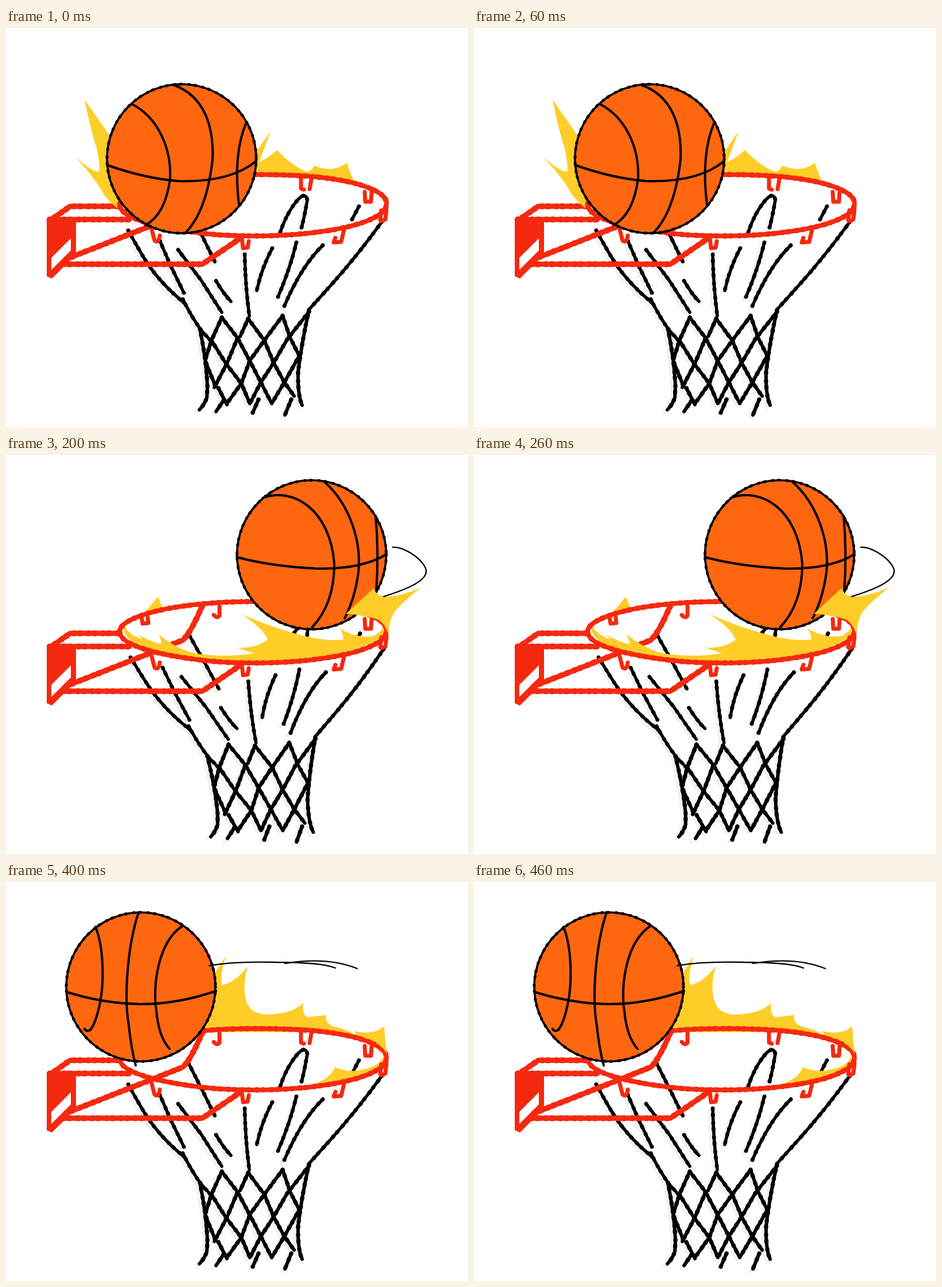
These frames come from a looping animation (805 px wide and 696 px high, 500 ms). An HTML page with a canvas:

```html
<!DOCTYPE html>
<html lang="en">
<head>
<meta charset="utf-8">
<title>Ball circling the rim</title>
<style>
html, body { margin: 0; width: 100%; height: 100%; overflow: hidden; background: #fff; }
canvas { display: block; }
</style>
</head>
<body>
<canvas id="stage" width="805" height="696"></canvas>
<script>
const ctx = document.getElementById('stage').getContext('2d');
const RED = '#f5290f', ORANGE = '#ff6610', YELLOW = '#ffcd27', INK = '#000', SHADE = '#f2f2f2';
const POSE_MS = 100, RADIUS = 130;

const path = (...parts) => new Path2D(parts.join(' '));

function line(shape, width, color = INK) {
  ctx.lineWidth = width;
  ctx.strokeStyle = color;
  ctx.stroke(shape);
}

// A stroke with the lumpy edge of a dry brush
function brush(shape, width, color = INK) {
  line(shape, width, color);
  ctx.setLineDash([1, 9, 2, 13]);
  line(shape, width + 1.4, color);
  ctx.setLineDash([]);
}

function fill(shape, color) {
  ctx.fillStyle = color;
  ctx.fill(shape);
}

// Hoop
const rim = path(
  'M198 308C198 285 270 266 340 260C400 253 510 255 560 262',
  'C620 270 663 286 663 306C663 330 610 347 550 355',
  'C490 364 410 365 350 359C280 351 198 335 198 308Z');
const plate = path('M71 333L122 335V395L80 437L71 433Z');
const slot = path('M79 401L113 367V388L79 422Z');
const bracket = path(
  'M76 336L112 311H198M76 334H215',
  'M100 412H342L408 367',
  'M105 403L250 346L308 323Q322 310 342 263');
const hooks = path(
  'M236 283L238 294L248 293L247 284M372 264V280Q368 286 362 279',
  'M514 263V280L519 282M532 264L529 281',
  'M625 286L626 303L636 303L637 286M652 335L654 318M663 317L661 334L654 337',
  'M589 352L584 373L571 374L574 366M411 367L413 384L421 383L423 372',
  'M254 352L259 371Q266 376 268 362');

// Net at rest
const strands = path(
  'M213 353Q225 375 235 392Q262 440 310 479M308 473Q325 507 340 527L358 547',
  'M268 371L287 415L310 462M300 387L340 440L376 496M318 316L343 365L364 408',
  'M366 441Q380 465 392 477M416 395Q417 450 424 502',
  'M478 356Q490 320 510 298Q522 286 525 300Q520 330 515 348',
  'M464 384Q445 420 437 458M506 374Q495 420 474 469M552 379Q515 415 485 485',
  'M615 311L603 334M655 338Q610 400 565 450L529 490');
const mesh = path(
  'M338 525Q349 580 351 625L350 645Q345 658 337 666',
  'M528 492Q515 550 509 600Q508 640 516 658',
  'M376 505L358 545L347 580L365 625M376 505L403 540L425 581L444 618L463 655',
  'M422 507L408 538M422 507L450 545L467 585L485 618L502 642',
  'M482 502L450 545L425 580L410 620L385 655M482 502L495 540L511 572L485 618L463 655',
  'M403 542L385 585L363 627M358 545L383 585L410 620L425 655',
  'M528 495L490 543L467 583L443 620L425 655',
  'M370 628L385 657M379 650L366 669M440 648L430 671M497 648L486 675');

// Net while it swings
const swungStrands = path(
  'M210 345Q225 385 248 418Q285 465 322 492L352 540L368 550',
  'M268 370Q285 410 315 462M303 384L345 440L380 494M345 366L359 390',
  'M373 442Q380 462 394 477M418 397Q419 450 430 503',
  'M478 358Q495 310 515 296Q525 292 520 312L516 345',
  'M470 368Q450 410 438 447M512 369Q498 420 481 465M552 380Q520 420 493 487',
  'M620 303L606 333M655 338Q600 420 532 495');
const swungMesh = path(
  'M530 495Q520 560 520 610Q522 640 531 657M345 533Q350 600 360 652',
  'M362 550L372 512Q378 500 390 520L440 600L466 632M355 545Q380 590 418 630',
  'M430 510L470 570L506 620M428 510L405 560L372 620',
  'M489 498L462 548L437 590L420 632M489 498L500 530L516 555M528 502Q490 552 466 630',
  'M512 590Q507 620 504 662M372 634L393 664M411 632L426 664',
  'M445 634L463 666M464 636L497 653');

const still = { shapes: [strands, mesh], lean: 0 };
const leaning = { shapes: [strands, mesh], lean: 0.05 };
const swung = { shapes: [swungStrands, swungMesh], lean: 0 };

// Each pose: ball centre, seams, speed lines, flames behind and before the ball
const poses = [
  {
    ball: [306, 228], net: still,
    seams: path(
      'M291 99C345 118 362 170 360 228Q350 320 312 358',
      'M220 133C262 155 288 205 286 262Q278 325 243 344',
      'M419 164Q395 220 406 309M176 239Q240 262 300 267Q390 270 436 232'),
    flame: path(
      'M137 125L180 187L240 300L215 328Q190 315 170 290Q158 265 119 223',
      'Q150 252 162 250Q165 245 158 210Q148 180 137 125Z',
      'M430 225L461 180L441 234Q455 228 472 213Q500 242 525 251',
      'Q534 248 537 240Q570 254 594 235Q600 255 607 267L560 262L430 258Z')
  },
  {
    ball: [468.5, 229], net: still,
    seams: path(
      'M385 134C460 125 530 175 525 245C520 300 480 350 432 356',
      'M461 99C540 95 580 180 575 250Q568 310 545 334',
      'M284 236Q340 264 430 268Q560 272 598 233'),
    speed: path('M194 225Q215 243 290 242Q335 242 323 237H302'),
    flame: path(
      'M198 302Q210 318 262 331Q270 330 257 310Q282 326 296 322Q304 312 285 281',
      'Q310 300 333 311Q328 303 318 300L340 300Q343 290 323 256L345 275',
      'L440 360Q300 365 215 330Q196 318 198 302Z')
  },
  {
    ball: [532.5, 174], net: leaning,
    seams: path(
      'M447 75C500 55 565 95 572 190Q572 260 533 301',
      'M555 47C598 85 620 150 614 205Q608 250 590 285',
      'M644 106Q650 170 645 240M402 178Q460 194 540 198Q620 200 663 173'),
    speed: path('M674 161C700 160 735 190 732 205C728 225 680 240 658 247'),
    flame: path(
      'M205 290Q205 310 238 322L230 314Q255 326 270 330Q272 325 266 313',
      'Q300 340 330 346Q380 354 432 346L403 336Q435 338 456 322Q448 302 411 278',
      'Q465 302 525 317Q560 325 588 322Q588 315 582 303Q610 320 640 316',
      'Q655 308 657 300L663 308Q640 340 520 357Q400 368 260 345Q196 325 205 290Z',
      'M242 274L265 247L273 268Z'),
    frontFlame: path(
      'M592 277L641 232Q645 247 664 247Q690 246 723 231Q685 262 676 275',
      'Q668 290 666 312Q660 295 650 288Q630 280 592 277Z')
  },
  {
    ball: [294, 151], net: swung,
    seams: path(
      'M206 56C262 66 335 118 337 170C332 225 285 245 254 250',
      'M310 24C370 65 395 115 391 165Q385 230 352 268',
      'M168 158Q230 170 290 170Q360 168 424 145'),
    flame: path(
      'M372 256L413 190Q430 200 450 192Q490 180 512 147Q480 200 480 220',
      'Q490 228 519 212Q520 235 530 240Q590 230 625 190Q605 235 613 248',
      'Q630 253 660 243Q650 250 657 268Q670 285 712 277Q680 295 664 318',
      'Q640 342 560 350Q600 325 625 322Q652 318 658 300Q640 276 560 262Z',
      'M300 349Q345 345 362 324Q372 345 398 353Q412 352 413 344',
      'Q430 353 510 355L500 360H350Z'),
    frontFlame: path(
      'M370 252L414 185L418 195L440 195V252Z',
      'M657 265Q675 285 712 277Q680 295 666 315Q668 298 645 280Z')
  },
  {
    ball: [235, 183], net: still,
    seams: path(
      'M156 78C172 120 170 180 164 210Q157 245 147 258Q140 262 137 256',
      'M231 53C212 110 205 200 214 250Q218 290 226 320',
      'M307 77C265 105 255 180 262 225Q266 270 285 291',
      'M106 192Q170 212 235 213Q300 213 366 190'),
    speed: path('M354 146Q400 138 470 140Q550 140 574 150M486 142Q560 130 612 151'),
    flame: path(
      'M345 262L350 180L383 129Q372 165 376 180Q400 175 421 147Q408 195 425 220',
      'Q440 235 470 230Q500 228 518 211Q515 230 525 236L558 232Q555 245 570 252',
      'Q590 255 611 268L607 260Q640 268 659 252Q660 280 664 300L655 298',
      'Q630 275 560 262Z',
      'M530 354Q565 345 573 323Q600 335 630 325Q655 318 658 300L664 308Q650 340 530 354Z'),
    frontFlame: path('M645 261L659 252Q660 275 664 300Q657 288 645 281Z')
  }
];

function drawNet({ shapes, lean }) {
  const layer = (dx, dy, color) => {
    ctx.save();
    ctx.translate(dx, dy);
    ctx.transform(1, 0, lean, 1, -270 * lean, 0);
    brush(shapes[0], 5.5, color);
    brush(shapes[1], 6, color);
    ctx.restore();
  };
  layer(-5, 4, SHADE);
  layer(0, 0, INK);
}

function drawHoop(flame) {
  fill(plate, RED);
  fill(slot, '#fff');
  brush(bracket, 9, RED);
  fill(flame, YELLOW);
  brush(rim, 8, RED);
  line(hooks, 7, RED);
}

function drawBall([x, y], seams) {
  const disc = new Path2D();
  disc.arc(x, y, RADIUS, 0, Math.PI * 2);
  fill(disc, ORANGE);
  line(seams, 4);
  brush(disc, 3.6);
}

function draw(now) {
  const pose = poses[Math.floor(now / POSE_MS) % poses.length];
  ctx.fillStyle = '#fff';
  ctx.fillRect(0, 0, 805, 696);
  drawNet(pose.net);
  drawHoop(pose.flame);
  drawBall(pose.ball, pose.seams);
  if (pose.frontFlame) fill(pose.frontFlame, YELLOW);
  if (pose.speed) line(pose.speed, 2.3);
}

ctx.lineCap = ctx.lineJoin = 'round';
const start = performance.now();
function tick() {
  draw(performance.now() - start);
  requestAnimationFrame(tick);
}
tick();
</script>
</body>
</html>
```
